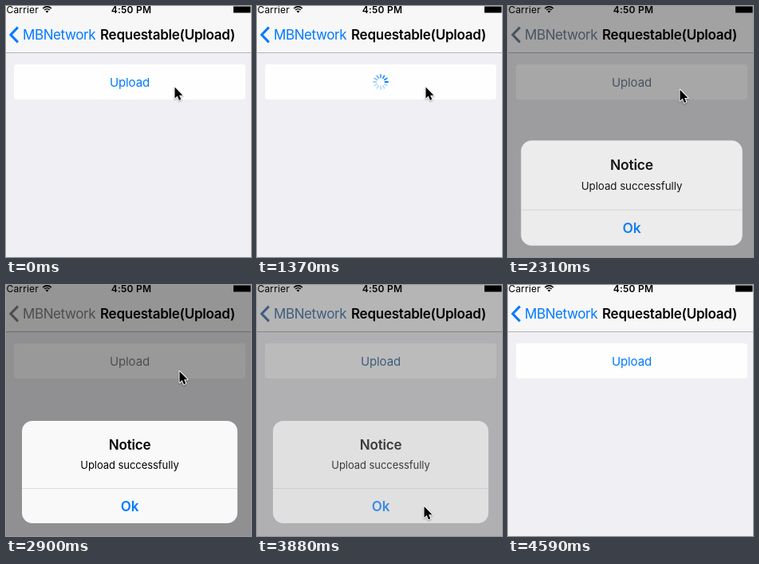
An HTML page with a canvas for the animation above (5820 ms loop, 307x314 px).

```html
<!DOCTYPE html>
<html lang="en">
<head>
<meta charset="utf-8">
<title>Upload notice</title>
<style>
  html, body { margin: 0; width: 100%; height: 100%; overflow: hidden; background: #efeff4; }
  canvas { display: block; width: 307px; height: 314px; }
</style>
</head>
<body>
<canvas id="stage" width="307" height="314"></canvas>
<script>
const W = 307, H = 314, LOOP = 5820;
const STEP = 58.6, FIRST = 780;
const SPIN_START = 775, SPIN_END = 2125;
const SHOW_AT = 2164, HIDE_AT = 3826;
const BLUE = [0, 122, 255], GREY = [128, 128, 128];

const stage = document.getElementById('stage').getContext('2d');
const layerCanvas = document.createElement('canvas');
layerCanvas.width = W;
layerCanvas.height = H;
const layer = layerCanvas.getContext('2d');

// Pointer tip: time, x, y
const pointerPath = [
  [0, 211.5, 101.5], [1660, 211.5, 101.5], [1890, 215.5, 104.5],
  [2830, 215.5, 105], [2890, 217.5, 108], [2980, 224, 128],
  [3100, 230, 178], [3220, 226, 232], [3340, 216, 268],
  [3430, 210, 282], [3530, 209.5, 277], [3890, 209.5, 277],
  [4100, 228, 286], [4354, 257, 302], [4530, 266, 311], [4585, 268, 320]
];

const mix = (a, b, p) => a + (b - a) * p;
const rgb = (a, b, p) => `rgb(${a.map((v, i) => Math.round(mix(v, b[i], p))).join(',')})`;

// Critically damped spring, 0 to 1
function spring(ms, rate) {
  if (ms <= 0) return 0;
  const x = ms / 1000 * rate;
  return 1 - (1 + x) * Math.exp(-x);
}

function pointerAt(t) {
  const i = pointerPath.findIndex(k => k[0] > t);
  if (i < 0) return pointerPath[pointerPath.length - 1].slice(1);
  const a = pointerPath[i - 1], b = pointerPath[i];
  const p = (t - a[0]) / (b[0] - a[0]);
  return [mix(a[1], b[1], p), mix(a[2], b[2], p)];
}

function text(c, str, x, y, size, weight, color, spacing, align = 'center') {
  c.font = `${weight} ${size}px Inter, sans-serif`;
  c.letterSpacing = spacing + 'px';
  c.textAlign = align;
  c.fillStyle = color;
  c.fillText(str, x, y);
}

function box(c, x, y, w, h, r, color) {
  c.fillStyle = color;
  c.beginPath();
  c.roundRect(x, y, w, h, r);
  c.fill();
}

function drawWifi(c) {
  c.strokeStyle = '#000';
  c.lineWidth = 1.6;
  c.lineCap = 'butt';
  for (const r of [4.6, 7.4]) {
    c.beginPath();
    c.arc(51.5, 8.3, r, -Math.PI * 0.75, -Math.PI * 0.25);
    c.stroke();
  }
  c.fillStyle = '#000';
  c.beginPath();
  c.moveTo(51.5, 8.6);
  c.arc(51.5, 8.6, 2.7, -Math.PI * 0.75, -Math.PI * 0.25);
  c.fill();
}

function drawHeader(c, tint) {
  c.fillStyle = '#f7f7f8';
  c.fillRect(0, 0, W, 58);
  c.fillStyle = '#b4b4b8';
  c.fillRect(0, 58, W, 1);

  text(c, 'Carrier', 0.5, 8.5, 12, 400, '#000', 0.15, 'left');
  text(c, '4:50 PM', 157, 8.5, 12, 600, '#000', 0.25);
  drawWifi(c);
  c.fillStyle = '#000';
  c.fillRect(285, 0.5, 21.5, 8);

  c.strokeStyle = tint;
  c.lineWidth = 3;
  c.lineJoin = 'miter';
  c.beginPath();
  c.moveTo(14.9, 26.6);
  c.lineTo(5.9, 36);
  c.lineTo(14.9, 45.4);
  c.stroke();
  text(c, 'MBNetwork', 21, 42, 17, 400, tint, -0.4, 'left');
  text(c, 'Requestable(Upload)', 202.5, 42, 17, 600, '#000', -0.24);
}

function drawSpinner(c, t) {
  const head = 3 + Math.floor((t - 1365) / (1000 / 12));
  c.save();
  c.translate(155, 95);
  c.lineWidth = 1.9;
  c.lineCap = 'round';
  for (let i = 0; i < 12; i++) {
    const age = ((head - i) % 12 + 12) % 12;
    const a = i * Math.PI / 6;
    c.strokeStyle = `rgba(${BLUE},${Math.max(0.27, 1 - age * 0.105)})`;
    c.beginPath();
    c.moveTo(Math.sin(a) * 5.6, -Math.cos(a) * 5.6);
    c.lineTo(Math.sin(a) * 9, -Math.cos(a) * 9);
    c.stroke();
  }
  c.restore();
}

function drawAlert(alpha, scale) {
  layer.clearRect(0, 0, W, H);
  layer.save();
  layer.translate(155, 234);
  layer.scale(scale, scale);
  layer.translate(-155, -234);
  box(layer, 20, 170, 270, 128, 13, '#f9f9f9');
  layer.fillStyle = '#dcdcde';
  layer.fillRect(20, 254, 270, 1);
  text(layer, 'Notice', 155, 206, 17, 600, '#000', -0.2);
  text(layer, 'Upload successfully', 155, 230, 13, 400, '#000', -0.06);
  text(layer, 'Ok', 155, 282.7, 17, 600, `rgb(${BLUE})`, -0.1);
  layer.restore();
  stage.globalAlpha = alpha;
  stage.drawImage(layerCanvas, 0, 0);
  stage.globalAlpha = 1;
}

function drawPointer(c, x, y) {
  c.save();
  c.translate(x, y);
  c.beginPath();
  c.moveTo(0, 0);
  for (const [px, py] of [[0, 14], [3.2, 11], [5.4, 16.2], [7.8, 15.2], [5.6, 10.2], [10, 10.2]]) c.lineTo(px, py);
  c.closePath();
  c.lineJoin = 'round';
  c.lineWidth = 2;
  c.strokeStyle = '#fff';
  c.shadowColor = 'rgba(0,0,0,.35)';
  c.shadowBlur = 2;
  c.shadowOffsetY = 1;
  c.stroke();
  c.shadowColor = 'transparent';
  c.fillStyle = '#000';
  c.fill();
  c.restore();
}

function draw(now) {
  const t = Math.max(0, FIRST + Math.floor((now - FIRST) / STEP + 0.2) * STEP);
  const shown = spring(t - SHOW_AT, 25);
  const level = shown * (1 - spring(t - HIDE_AT, 20));
  const tint = rgb(BLUE, GREY, level);

  stage.fillStyle = '#efeff4';
  stage.fillRect(0, 0, W, H);
  drawHeader(stage, tint);
  box(stage, 10, 73, 290, 44, 4, '#fefefe');
  if (t >= SPIN_START && t < SPIN_END) drawSpinner(stage, t);
  else text(stage, 'Upload', 155, 100.7, 15, 400, tint, -0.1);

  if (level > 0.002) {
    stage.fillStyle = `rgba(0,0,0,${0.4 * level})`;
    stage.fillRect(0, 0, W, H);
    drawAlert(level, 1.2 - 0.2 * shown);
  }
  const [x, y] = pointerAt(t);
  if (y < H) drawPointer(stage, x, y);
}

const start = performance.now();
function tick() {
  requestAnimationFrame(tick);
  draw((performance.now() - start) % LOOP);
}
tick();
</script>
</body>
</html>
```
